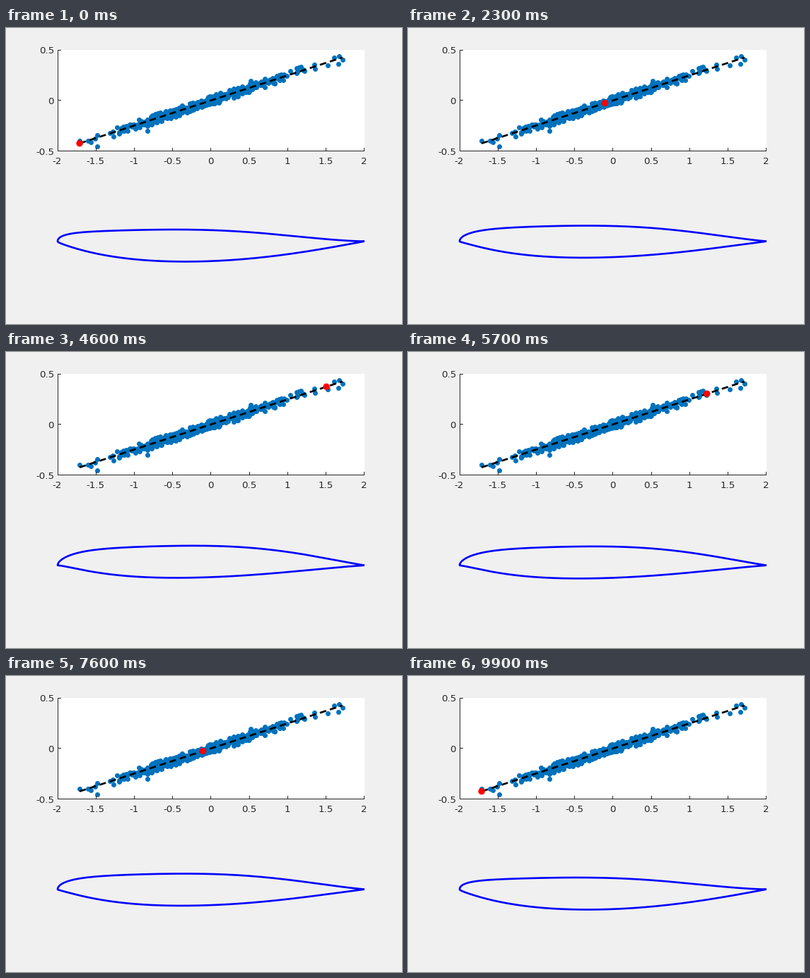
These frames come from a looping animation (560x420 px, 10 s). A matplotlib script:

```python
import numpy as np
import matplotlib.pyplot as plt
from matplotlib.animation import FuncAnimation
from matplotlib.patches import Circle, Rectangle

W, H, DPI = 560, 420, 100
PX = 72 / DPI                      # one pixel in points
STEPS = 50                         # poses in one sweep
X_MIN, X_MAX = -1.712, 1.715
INK = "#262626"
LEFT, RIGHT, TOP, BOTTOM = 73, 507, 31, 175

plt.rcParams["font.family"] = "DejaVu Sans"

fig = plt.figure(figsize=(W / DPI, H / DPI), dpi=DPI, facecolor="#f0f0f0")
ax = fig.add_axes([0, 0, 1, 1])
ax.set_xlim(0, W)
ax.set_ylim(H, 0)
ax.axis("off")


def px_x(x):
    return 289.8 + 108.5 * x


def px_y(y):
    return 102.8 - 144 * y


def trend(x):
    return 0.247 * x


def rule(x0, y0, x1, y1):
    ax.plot([x0, x1], [y0, y1], color=INK, lw=PX, zorder=6, snap=False,
            solid_capstyle="projecting")


def label(x, y, value, ha):
    ax.text(x, y, f"{value:g}", ha=ha, va="baseline", color=INK,
            fontsize=13.33 * PX)


def draw_axes():
    ax.add_patch(Rectangle((LEFT, TOP), RIGHT - LEFT, BOTTOM - TOP,
                           fc="white", ec="none", zorder=0))
    x0, x1, y0, y1 = LEFT + 0.5, RIGHT - 0.5, TOP + 0.5, BOTTOM - 0.5
    rule(x0, y1, x1, y1)
    rule(x0, y0, x0, y1)
    for v in np.arange(-2, 2.1, 0.5):
        x = np.clip(np.floor(px_x(v)) + 0.5, x0, x1)
        rule(x, y1, x, y1 - 4)
        label(px_x(v) - 0.3, 193, v, "center")
    for v in (-0.5, 0, 0.5):
        y = np.clip(np.floor(px_y(v)) + 0.5, y0, y1)
        rule(x0, y, x0 + 4, y)
        label(68, px_y(v) + 5, v, "right")


def draw_cloud():
    rng = np.random.default_rng(7)
    x = rng.normal(0, 0.6, 520)
    x = x[np.abs(x) < 1.6]
    y = trend(x) + np.clip(rng.normal(0, 0.022, x.size), -0.045, 0.045)
    outliers = [(-1.71, -0.4), (-1.6, -0.4), (-1.48, -0.45), (-1.48, -0.34),
                (-0.83, -0.3), (0.52, 0.19), (1.61, 0.42), (1.66, 0.36),
                (1.67, 0.435), (1.72, 0.4)]
    far_x, far_y = np.transpose(outliers)
    ax.plot(px_x(np.append(x, far_x)), px_y(np.append(y, far_y)), "o",
            ms=7 * PX, mfc="#0072bd", mec="none", zorder=2)


def surface(*factors):
    """Depth below or above the chord, from shape factors even in sqrt(t)."""
    knots = np.linspace(0, 1, len(factors))
    shape = np.polyfit(knots, factors, len(factors) - 1)
    return root * (1 - root ** 2) * np.polyval(shape, root)


draw_axes()
draw_cloud()

ends = np.array([X_MIN, X_MAX])
ax.plot(px_x(ends), px_y(trend(ends)), color="black", lw=2.67 * PX, zorder=4,
        dashes=(9.3 / 2.67, 5.6 / 2.67), dash_capstyle="butt")

# Airfoil poses near the two ends of the sweep; those between are mixed.
root = np.linspace(0, 1, 161)
thin_nose = np.append(-surface(72, 55, 44, 43.5, 43.5, 8)[::-1],
                      surface(24, 39, 60, 74, 83, 81))
full_nose = np.append(-surface(66, 74, 70.5, 71.5, 85, 74)[::-1],
                      surface(4, 15, 36, 46, 46.5, 28))
foil_x = 73 + 433.7 * np.append(root[::-1], root) ** 2

foil, = ax.plot([], [], color="blue", lw=2.67 * PX, zorder=4,
                solid_joinstyle="round", solid_capstyle="butt")
marker = ax.add_patch(Circle((0, 0), 4.7, fc="red", ec="none", zorder=7))


def update(n):
    i = min(n, 2 * STEPS - 1 - n)
    x = X_MIN + (X_MAX - X_MIN) * i / (STEPS - 1)
    marker.center = px_x(x), px_y(trend(x))
    mix = (x - X_MIN) / (1.505 - X_MIN)
    foil.set_data(foil_x, 302.7 + thin_nose + mix * (full_nose - thin_nose))
    return foil, marker


anim = FuncAnimation(fig, update, frames=2 * STEPS, interval=100,
                     repeat=True, repeat_delay=0, blit=False)
plt.show()
```
